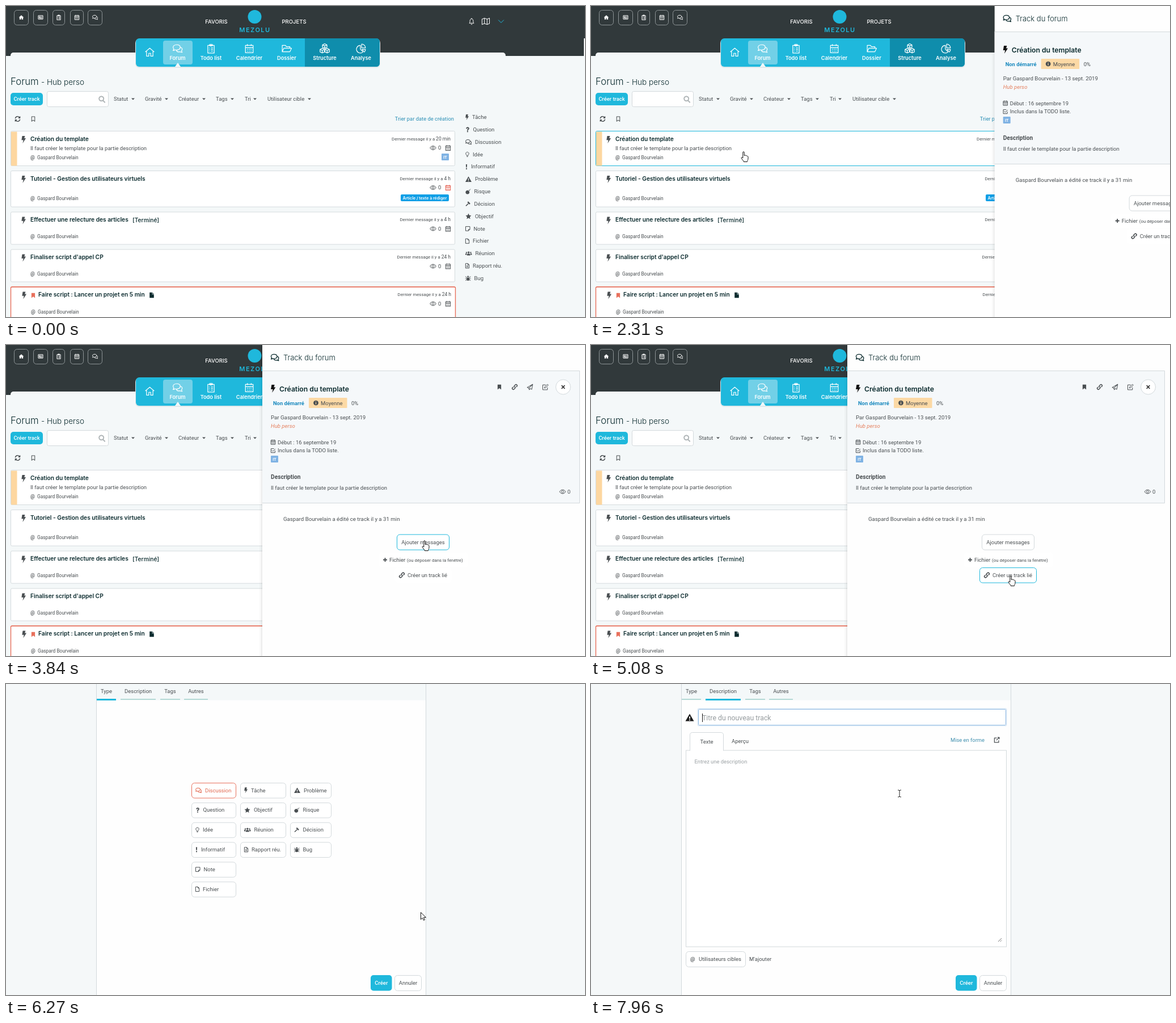
An HTML page that plays this animation: 1021x548 px, repeating every 7990 ms.

```html
<!DOCTYPE html>
<html lang="fr">
<head>
<meta charset="utf-8">
<title>Forum</title>
<style>
html, body { margin: 0; width: 100%; height: 100%; overflow: hidden; background: #f4f8f9; }
svg { display: block; }
text { font: 9.5px Roboto, sans-serif; fill: currentColor; }
#stage { color: #4a4f52; }
.h { font-family: Inter, sans-serif; font-weight: 600; }
.t { font-family: Inter, sans-serif; font-weight: 500; }
.l { font-family: Inter, sans-serif; font-weight: 300; }
.b { font-weight: 700; }
.s { font-weight: 500; }
.i { font-style: italic; }
.m { text-anchor: middle; }
.e { text-anchor: end; }
.logo { letter-spacing: 1.5px; }
.on { color: #e2684f; }
</style>
</head>
<body>
<svg id="stage" width="1021" height="548"></svg>
<script>
const CYAN = '#1fb8dc', LINE = '#d3d9dc', DARK = '#0b2b2e', RED = '#e8705c', PALE = '#f4f8f9', BLUE = '#2b8fb5';
const AUTHOR = 'Gaspard Bourvelain';

const cube = (x, y) => `M${x} ${y}l3.5 1.7v3.8l-3.5 1.7-3.5-1.7v-3.8zm-3.5 1.7l3.5 1.7 3.5-1.7m-3.5 1.7v3.8`;
const FILE = 'M3 1.5h6.5L13 5v9.500H3zM9.500 1.500V5H13';

// Icons on a 16-unit grid; a leading * marks a filled one.
const ICONS = {
  home: '*M8 2 1 8.2h2V14h4v-4h2v4h4V8.2h2z',
  house: 'M1 8 8 2l7 6M3 7v7.5h3.5V10h3v4.5H13V7',
  news: 'M1.500 3h13v10h-13zM4 6h4v3H4zM10 6h2.500M10 8.500h2.500M4 11h8.500',
  list: 'M3 3h10v12H3zM6 1.500h4V4H6zM5 7h1M8 7h3M5 9.500h1M8 9.500h3M5 12h1M8 12h3',
  cal: 'M2 3h12v11.500H2zM2 6.500h12M5 1v3M11 1v3M4.500 9H6M7.300 9h1.500M10 9h1.500M4.500 12H6M7.300 12h1.500M10 12h1.500',
  chat: 'M6.500 2C3 2 1 4 1 6c0 1 .5 2 1.300 2.800L1 11c1.500 0 2.500-.5 3.200-1 4 1 8-.8 8-4S9.500 2 6.500 2zM12.500 6c2 .5 2.800 2 2.800 3.200 0 1-.5 2-1.200 2.600l1.200 2.200c-1.500 0-2.500-.5-3.200-1-2.600.6-5-.2-6-2',
  bell: 'M8 1v1.500M3 12c1-1 1.500-2 1.500-5C4.500 4.500 6 2.500 8 2.500S11.500 4.500 11.500 7c0 3 .5 4 1.500 5zM6.500 14.500h3',
  map: 'M1 4l4.500-2 5 2L15 2v10l-4.500 2-5-2L1 14zM5.500 2v10M10.500 4v10',
  chev: 'M2 5l6 6 6-6',
  folder: 'M1 13V3h5l1.500 2H13v2.500M1 13l2.500-5.500h12L13 13z',
  cubes: cube(8, .5) + cube(4.2, 7.7) + cube(11.8, 7.7),
  pie: 'M7 3a6 6 0 1 0 4.200 10.200L7 9zM9 1v6h6a6 6 0 0 0-6-6zM9.500 9.500H15a6 6 0 0 1-1.700 4z',
  sync: 'M2 7a6 6 0 0 1 11-2.500M14 1.500v4h-4M14 9a6 6 0 0 1-11 2.500M2 14.500v-4h4',
  mark: 'M4 2h8v12l-4-3-4 3z',
  marked: '*M3 1h10v14l-5-4-5 4z',
  search: 'M7 1.500a5 5 0 1 0 .01 0zM10.500 10.500 15 15',
  caret: '*M2 5h12l-6 6z',
  bolt: '*M5 0h6L9.500 5H13L6 16l1.500-7h-4z',
  eye: 'M1 8c3.500-6 10.500-6 14 0-3.500 6-10.500 6-14 0zM8 5.500a2.500 2.500 0 1 0 .01 0z',
  ask: '*M4 5c0-5.500 9-5.500 9 0 0 3-3.200 3-3.200 5.500H6.700c0-4 3.200-3.500 3.200-5.500 0-1.500-2.800-1.500-2.800.7zM6.700 12h3.100v3H6.700z',
  bulb: 'M6 12v-2C2 7 3.500 1.500 8 1.500S14 7 10 10v2zM6.500 14.500h3',
  bang: '*M6.200 1h3.600L9.200 10H6.800zM6.400 11.800h3.200V15H6.400z',
  warn: '*M8 1l8 14H0zM7 6v4.500h2V6zM7 11.800v1.700h2v-1.700z',
  bomb: '*M6.500 4.500a5.500 5.500 0 1 0 .01 0zM10 4l2 2 1.500-1.500-2-2zM13.500 2l1-1.500 1.200 1.200L14 3z',
  gavel: '*M8.500 1l6 6L12 9.500l-6-6zM8 6.500 9.500 8 3 14.500 1 13z',
  star: '*M8 .8l2.200 4.700 5 .6-3.700 3.500 1 5.100L8 12.200l-4.500 2.500 1-5.100L.8 6.100l5-.6z',
  note: 'M2 2h12v8l-4 4H2zM10 14v-4h4',
  file: FILE,
  page: '*M2.500 1H9v5h4.500v9h-11zM10 1l3.500 4H10z',
  doc: FILE + 'M5.500 8h5M5.500 11h5',
  users: '*M8 3a2.300 2.300 0 1 0 .01 0zM4 13v-2.500c0-3 8-3 8 0V13zM2.800 4a1.700 1.700 0 1 0 .01 0zM0 11.500v-2C0 7.500 3 7.500 3.500 8.300L3 11.500zM13.200 4a1.700 1.700 0 1 0 .01 0zM16 11.500v-2c0-2-3-2-3.500-1.200l.5 3.200z',
  bug: '*M5 4.500a3 3 0 0 1 6 0zM4 6h8v5a4 4 0 0 1-8 0zM0 8h3.500v1.500H0zM12.500 8H16v1.500h-3.500zM1 2.500l3 3-.8 1-3-3zM15 2.500l-3 3 .8 1 3-3zM.5 14.500l3-3 .8 1-3 3zM15.500 14.500l-3-3-.8 1 3 3z',
  link: 'M7 9a3 3 0 0 1 0-4l2.500-2.500a2.800 2.800 0 0 1 4 4L12 8M9 7a3 3 0 0 1 0 4l-2.500 2.500a2.800 2.800 0 0 1-4-4L4 8',
  plane: 'M15 1 1 9l4 2 1 4 2.500-3 4 2zM5 11 15 1',
  edit: 'M9 3H2v11.500h11V9M6 10.500 6.500 8 13 1.500l2 2L8.500 10z',
  open: 'M8 3H2v11.500h11V9M10 1.500h4.500V6M14.500 1.500 7 9',
  info: '*M8 1a7 7 0 1 0 .01 0zM7 4h2v2H7zM7 7h2v5H7z',
  check: 'M14 8v6.500H1.500V2H11M4 7l3.500 3.500L15 3',
  cross: 'M3 3l10 10M13 3 3 13',
  plus: 'M8 1v14M1 8h14'
};

const T = (x, y, s, cls = '', size = 9.5, color = '') =>
  `<text x="${x}" y="${y}" class="${cls}" style="font-size:${size}px;color:${color}">${s}</text>`;
const R = (x, y, w, h, fill, stroke = 'none', r = 0, more = '') =>
  `<rect x="${x}" y="${y}" width="${w}" height="${h}" rx="${r}" fill="${fill}" stroke="${stroke}" ${more}/>`;
// Rectangle whose border reacts to the pointer.
const hot = (layer, x, y, w, h, base = LINE, r = 5, fill = '#fff') =>
  R(x + .5, y + .5, w, h, fill, base, r, `data-layer="${layer}" data-base="${base}"`);
const I = (name, cx, cy, size = 10, color = 'currentColor', width = 1) => {
  const d = ICONS[name], k = size / 16;
  const paint = d[0] === '*' ? `fill="${color}" fill-rule="evenodd"`
    : `fill="none" stroke="${color}" stroke-width="${width / k}" stroke-linejoin="round"`;
  return `<path transform="translate(${cx - size / 2} ${cy - size / 2}) scale(${k})" d="${d.replace('*', '')}" ${paint}/>`;
};
const each = (list, f) => list.map(f).join('');

const KINDS = [
  ['bolt', 'Tâche', 12], ['ask', 'Question', 13.5], ['chat', 'Discussion', 17], ['bulb', 'Idée', 13],
  ['bang', 'Informatif', 10], ['warn', 'Problème', 17], ['bomb', 'Risque', 15.5], ['gavel', 'Décision', 15.500],
  ['star', 'Objectif', 17], ['note', 'Note', 14.5], ['file', 'Fichier', 13], ['users', 'Réunion', 17.5],
  ['doc', 'Rapport réu.', 13], ['bug', 'Bug', 15.5]];
const kind = ([icon, label, gap], x, cy) =>
  I(icon, x + (gap - 6) / 2, cy, Math.max(10, gap - 6)) + T(x + gap, cy + 3.2, label);

function header() {
  const buttons = [['home', 14, 26], ['news', 48, 26], ['list', 82, 22], ['cal', 113, 24], ['chat', 144, 26]];
  const tabs = [['chat', 'Forum', 302.5], ['list', 'Todo list', 361.5], ['cal', 'Calendrier', 429],
    ['folder', 'Dossier', 495], ['cubes', 'Structure', 562], ['pie', 'Analyse', 626]];
  return R(0, 0, 1021, 88, '#31393b') + R(8, 82, 873, 20, PALE, 'none', 5) + R(1019, 57, 2, 31, '#fff') +
    each(buttons, ([n, x, w]) => R(x + .5, 7.5, w - 1, 26, 'none', '#8d9496', 5) + I(n, x + w / 2, 20, 10, '#fff')) +
    T(371, 31, 'FAVORIS', 't m', 9.5, '#fff') + T(508, 31, 'PROJETS', 't m', 9.5, '#fff') +
    `<circle cx="438.500" cy="19" r="12" fill="${CYAN}"/>` + T(439, 46, 'MEZOLU', 'h m logo', 11, CYAN) +
    I('bell', 821, 27, 13, '#fff') + I('map', 846, 27, 15, '#fff') + I('chev', 873, 27, 13, CYAN) +
    R(228, 58, 432, 51, '#dfe8eb', 'none', 7) + R(229, 57, 430, 50, CYAN, 'none', 6) +
    '<path d="M527 57h126a6 6 0 0 1 6 6v38a6 6 0 0 1-6 6H527z" fill="#0f8dac"/>' +
    R(277, 61, 52, 42, '#72d0e7', 'none', 4) + `<path d="M298 107l5-7 5 7z" fill="${PALE}"/>` +
    I('house', 253.500, 81, 18, '#fff', 1.2) +
    each(tabs, ([n, s, x]) => I(n, x, 75, 18, '#fff', 1.2) + T(x, 95, s, 'h m', 9.2, '#fff'));
}

function toolbar() {
  const filters = [['Statut', 190, 224], ['Gravité', 245, 283], ['Créateur', 304, 349], ['Tags', 370, 399],
    ['Tri', 421, 439], ['Utilisateur cible', 461, 535]];
  return T(8, 139, 'Forum', 'l', 16.8, DARK) + T(62, 139, '- Hub perso', 'l', 13.6, DARK) +
    R(8, 153, 57, 22, CYAN, 'none', 5) + T(36.5, 167, 'Créer track', 's m', 9.4, '#fff') +
    R(72.5, 150.5, 108, 27, '#fff', LINE, 3) + I('search', 169, 164.5, 13, '#b0b6b8', 2) +
    each(filters, ([s, x, c]) => T(x, 167, s) + I('caret', c, 164, 8)) +
    I('sync', 20.5, 199, 11, 'currentColor', 1.4) + I('mark', 48, 199, 11) +
    T(790, 202, 'Trier par date de création', 'e', 9.4, BLUE);
}

function row(title, y, h, age, shift = 0) {
  const top = y + 14, red = shift > 0, by = y + (h > 60 && h < 63 ? 50 : h > 62 ? 52 : 46) + shift;
  return hot('page', 8, y, 783 + shift, h, red ? RED : '#d5dbde', 2) +
    (red ? R(8.5, y + .5, 784, h, 'none', RED, 2, 'stroke-width="1.4"') : '') +
    I('bolt', 31 + shift, top + 1.5, 13) + T(red ? 57 : 43, top + 3.7, title, 'h', 10.2, DARK) +
    T(43 + shift, by, '@', 's', 8.8) + T(55 + shift, by, AUTHOR, '', 8.4) +
    `<text x="${784 + shift}" y="${top + 2.5}" class="e" style="font-size:7.8px">Dernier message il y a <tspan font-size="8.5" style="font-size:8.500px">${age}</tspan></text>` +
    I('eye', 753, top + 16, 12) + T(762, top + 19.3, '0') +
    I('cal', 779.500, top + 16, 11, y === 290 ? '#e2503f' : 'currentColor');
}

const tag = (x, y) => R(x, y, 13, 12, '#80b3e4', 'none', 1) + T(x + 6.5, y + 8.7, 'IT', 'b m', 7, '#fff');

function page() {
  return R(0, 0, 1021, 548, PALE) + header() + toolbar() +
    row('Création du template', 220, 61, '20 min') + R(9, 221.5, 10.500, 60, '#fdd7a0') +
    T(43, 254, 'Il faut créer le template pour la partie description') + tag(768, 260) +
    row('Tutoriel - Gestion des utilisateurs virtuels', 290, 63.5, '4 h') +
    R(696, 332, 85, 12, '#109fe6', 'none', 2) + T(738.5, 340.600, 'Article / texte à rédiger', 'h m', 7, '#fff') +
    row('Effectuer une relecture des articles', 362.5, 57, '4 h') + T(223, 380.500, '[Terminé]', 't', 10.2, DARK) +
    row("Finaliser script d'appel CP", 428.5, 57, '24 h') +
    row('Faire script : Lancer un projet en 5 min', 494.5, 60, '24 h', 1) +
    I('marked', 48, 510, 10, RED) + I('page', 257, 509.5, 11, DARK) +
    each(KINDS, (k, i) => kind(k, 810, 196 + i * 21.82));
}

function panel() {
  return R(447, -5, 600, 560, '#000', 'none', 0, 'opacity=".025"') + R(450, -5, 600, 560, '#000', 'none', 0, 'opacity=".05"') +
    R(452, 0, 600, 548, '#fefefe') + R(452, 45, 559, 234, '#f5f8fa') +
    `<path d="M452 45.500h559.500v233H452" fill="none" stroke="${LINE}"/>` +
    I('chat', 474, 22, 15, DARK, 1.3) + T(489, 27, 'Track du forum', 'l', 13, DARK) +
    I('bolt', 471, 77, 14, '#111') + T(482, 81.500, 'Création du template', 'h', 12.2, DARK) +
    I('marked', 870, 74, 10) + I('link', 897, 74, 11, 'currentColor', 1.5) + I('plane', 924, 74, 11) + I('edit', 951, 74, 12) +
    `<circle cx="982.500" cy="74" r="13" fill="#fff" stroke="${LINE}"/>` + I('cross', 982.5, 74, 9, '#333', 1.6) +
    T(471, 105.5, 'Non démarré', 'b', 9.4, '#1b8abf') + R(534, 93, 67.5, 18, '#fcd9a5', 'none', 1) +
    I('info', 546.5, 102, 10) + T(555, 105.5, 'Moyenne') + T(609, 105.500, '0%') +
    T(467, 131, `Par ${AUTHOR} - 13 sept. 2019`, '', 9.7) + T(467, 145.5, 'Hub perso', 'i', 9.6, '#e5805f') +
    I('cal', 471, 171, 10) + T(479, 174.5, 'Début : 16 septembre 19') +
    I('check', 471, 186, 9) + T(479, 189, 'Inclus dans la TODO liste.') + tag(467, 195) +
    T(467, 235.5, 'Description', 'b', 10.2) + T(467, 254.5, 'Il faut créer le template pour la partie description') +
    I('eye', 981.500, 258.5, 12) + T(990, 262, '0') +
    T(489, 310, `${AUTHOR} a édité ce track il y a 31 min`, '', 9.7) +
    hot('panel', 689, 333.5, 92, 27) + T(735.500, 350.5, 'Ajouter messages', 'm') +
    hot('panel', 657, 365, 157, 26, 'transparent') + I('plus', 668.500, 378.500, 8, 'currentColor', 1.8) +
    T(676, 382, 'Fichier') + T(707, 382, '(ou déposer dans la fenêtre)', '', 7.9) +
    hot('panel', 685, 392, 100, 26.5, 'transparent') + I('link', 698, 405.5, 11, 'currentColor', 1.600) +
    T(708, 408.500, 'Créer un track lié', '', 9.4);
}

const TABS = [['Type', 160, 34], ['Description', 202, 62], ['Tags', 272, 35], ['Autres', 314, 42]];
const bar = (i, color, h) => R(TABS[i][1], 26, TABS[i][2], h, color);

function types() {
  const columns = [[327, 78, [2, 1, 3, 4, 9, 10]], [413, 80, [0, 8, 11, 12]], [501, 72, [5, 6, 7, 13]]];
  return each(columns, ([x, w, ids]) => each(ids, (id, i) => {
    const y = 174 + i * 34.85;
    return `<g data-kind="${id}">${hot('types', x, y, w, 26.5) + kind(KINDS[id], x + 7, y + 13.3)}</g>`;
  }));
}

function modal() {
  return R(0, 0, 1021, 548, '#f5f8f9') + R(159.5, -1, 581, 552, '#fefefe', LINE) + R(160, 0, 580, 28.5, PALE) +
    each(TABS, ([s, x, w], i) => T(x + w / 2, 16, s, 'm') + bar(i, '#b4d9d6', 2)) +
    `<g id="tabA">${bar(0, CYAN, 3)}</g><g id="tabB">${bar(1, CYAN, 3)}</g>` +
    `<g id="types">${types()}</g>` +
    `<g id="head">${I('warn', 174, 59, 15, '#1c1c1c') + R(188, 43, 545, 31, 'none', '#d8e7f6', 2) +
      R(189.5, 44.5, 542, 28, '#fff', '#86b4e0', 1) + T(196, 63.5, 'Titre du nouveau track', '', 12.3, '#959b9e') +
      R(196, 52, 1, 15, '#111')}</g>` +
    `<g id="body">${R(167.5, 117, 565, 346, '#fff', LINE) +
      `<path d="M174.500 117.500V90a4 4 0 0 1 4-4.500h51a4 4 0 0 1 4 4.500v27.500" fill="#fff" stroke="${LINE}"/>` +
      R(175, 116, 58, 3, '#fff') + T(204, 104.5, 'Texte', 'm') + T(248, 104, 'Aperçu') +
      T(634, 102, 'Mise en forme', '', 9.4, '#3f8fae') + I('open', 715.500, 98.500, 11, 'currentColor', 1.2) +
      T(182.5, 139.5, 'Entrez une description', '', 9.4, '#9ba1a4') +
      '<path d="M718 454l6-6M721.500 454l2.500-2.500" stroke="#777"/>' +
      hot('none', 167, 471, 105, 27) + T(175, 488, '@', 's') + T(190, 488, 'Utilisateurs cibles') + T(279, 488, "M'ajouter")}</g>` +
    R(643, 513, 37.5, 27.5, CYAN, 'none', 5) + T(661.8, 530, 'Créer', 's m', 9.5, '#fff') +
    hot('none', 685, 513, 47, 27) + T(709, 530, 'Annuler', 'm');
}

const pen = 'fill="#fff" stroke="#111" stroke-linejoin="round"';
const cursor = `<g id="cursor">
  <path id="arrow" d="M0 0v12.500l3-2.800 2 4.300 2-.9-2-4.200h4z" ${pen}/>
  <path id="hand" d="M-1.200 1a1.200 1.200 0 0 1 2.400 0v5.500l1-.3a1.300 1.300 0 0 1 2 .6 1.400 1.400 0 0 1 2 .7c1-.2 1.800.3 1.800 1.300V12c0 2-1 3-1.500 4.500v1H.2v-1l-3.700-4.700c-1.200-1.600.4-2.800 1.600-1.600l.7.8z" ${pen}/>
  <path id="beam" d="M-3-6h2l1 1 1-1h2M0-5V5M-3 6h2l1-1 1 1h2" fill="none" stroke="#222"/></g>`;

const stage = document.getElementById('stage');
stage.innerHTML = `<g>${page()}</g><g id="panel">${panel()}</g><g id="modal">${modal()}</g>${cursor}`;
const el = id => document.getElementById(id);
const show = (id, v) => { el(id).style.opacity = v; el(id).style.display = v > 0 ? '' : 'none'; };
const hots = [...stage.querySelectorAll('[data-layer]')].map(e => ({
  e, layer: e.dataset.layer, base: e.dataset.base, kind: e.parentNode.dataset.kind,
  x: e.x.baseVal.value, y: e.y.baseVal.value, w: e.width.baseVal.value, h: e.height.baseVal.value
}));

const LOOP = 7990, MODAL = 5200, PICK = 7400, SWITCH = 7500;
const ramp = (t, a, b) => Math.min(1, Math.max(0, (t - a) / (b - a)));
const ease = (t, a, b) => { const k = ramp(t, a, b); return k * k * (3 - 2 * k); };
// start, end, target x, target y
const MOVES = [[190, 940, 269, 257], [2730, 3560, 738, 345], [4090, 4880, 740, 407],
  [5230, 5690, 732, 403], [6240, 7250, 544, 193]];

function draw(t) {
  let x = 908, y = 536;
  for (const [a, b, tx, ty] of MOVES) {
    const k = ease(t, a, b);
    x += (tx - x) * k;
    y += (ty - y) * k;
  }
  const slide = 569 * (1 - ease(t, 2020, 2570));
  el('panel').setAttribute('transform', `translate(${slide} 0)`);
  show('panel', slide < 569 ? 1 : 0);
  show('modal', ease(t, MODAL, 5750));

  const typing = t >= SWITCH, late = ramp(t, SWITCH, 7960);
  show('types', typing ? 0 : 1);
  show('body', ramp(t, SWITCH, 7860));
  show('head', late);
  show('tabA', 1 - late);
  show('tabB', late);

  const live = t >= MODAL ? (t > 5750 && !typing ? 'types' : '') : x < 452 + slide ? 'page' : 'panel';
  const chosen = t < PICK ? '2' : '5';
  let over = false;
  for (const r of hots) {
    const hit = t >= 190 && r.layer === live && x >= r.x && x <= r.x + r.w && y >= r.y && y <= r.y + r.h;
    const on = r.kind === chosen;
    over = over || hit;
    r.e.style.stroke = on ? RED : hit ? CYAN : r.base;
    if (r.kind) r.e.parentNode.setAttribute('class', on ? 'on' : '');
  }
  const shape = typing && y > 117 ? 'beam' : over ? 'hand' : 'arrow';
  for (const id of ['arrow', 'hand', 'beam']) show(id, id === shape ? 1 : 0);
  show('cursor', t >= 190 ? 1 : 0);
  el('cursor').setAttribute('transform', `translate(${x} ${y})`);
}

const begin = performance.now();
function tick() {
  draw((performance.now() - begin) % LOOP);
  requestAnimationFrame(tick);
}
tick();
</script>
</body>
</html>
```
